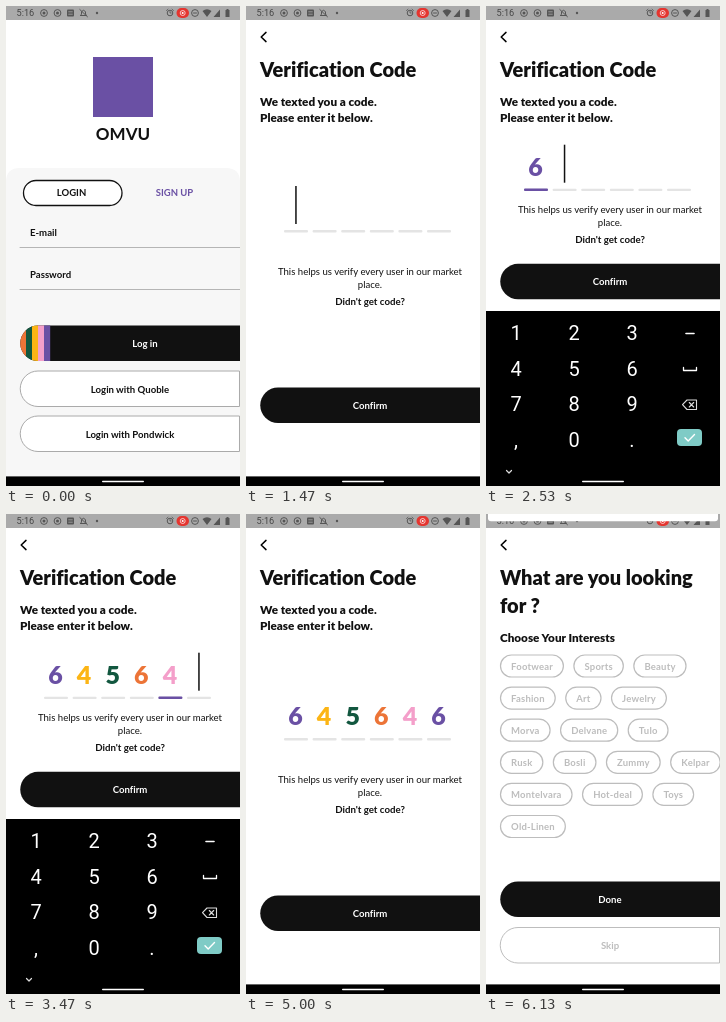
Recreate the animation shown at these times as an HTML page. Size 234x480 px, loop 6.19 s.

```html
<!DOCTYPE html>
<html lang="en">
<head>
<meta charset="utf-8">
<title>Sign-in flow</title>
<style>
  html, body { margin: 0; height: 100%; overflow: hidden; background: #fff; }
  svg { display: block; width: 100vw; height: 100vh; }
  text { font-family: Lato, sans-serif; font-variant-ligatures: none; white-space: pre; }
  .keys text, .status text { font-family: Roboto, sans-serif; }
  #chips text { letter-spacing: .2px; }
</style>
</head>
<body>
<svg id="stage" viewBox="0 0 234 480"></svg>
<script>
const PURPLE = '#6a50a4', YELLOW = '#fcb515', GREEN = '#12573f', ORANGE = '#ec7437', PINK = '#f49fca';
const INK = '#111', PALE = '#bdbdbd';
const LOOP = 6190, TICKS_PER_MS = 15 / 1000;

const CODE = '645646';
const CODE_COLORS = [PURPLE, YELLOW, GREEN, ORANGE, PINK, PURPLE];
const TYPED = [37, 40, 43, 47, 51, 54];   // tick at which each digit appears
const KEY_COLUMN = { 4: 0, 5: 1, 6: 2 };
const CHIPS = [
  ['Footwear', 'Sports', 'Beauty'],
  ['Fashion', 'Art', 'Jewelry'],
  ['Morva', 'Delvane', 'Tulo'],
  ['Rusk', 'Bosli', 'Zummy', 'Kelpar'],
  ['Montelvara', 'Hot-deal', 'Toys'],
  ['Old-Linen'],
];

// Markup helpers
const text = (s, x, y, size, { fill = INK, weight = 700, anchor = 'start', more = '' } = {}) =>
  `<text x="${x}" y="${y}" font-size="${size}" font-weight="${weight}" fill="${fill}" text-anchor="${anchor}" ${more}>${s}</text>`;
const centered = (s, x, y, size, options) => text(s, x, y, size, { anchor: 'middle', ...options });
const heading = (s, y, size) => text(s, 14, y, size, { weight: 900 });
const rect = (x, y, w, h, fill, more = '') =>
  `<rect x="${x}" y="${y}" width="${w}" height="${h}" fill="${fill}" ${more}/>`;
const line = (d, stroke, width = 1) =>
  `<path d="${d}" fill="none" stroke="${stroke}" stroke-width="${width}" stroke-linecap="round" stroke-linejoin="round"/>`;
const pill = (y, right = 234) => `M${right} ${y}H32a17.75 17.75 0 0 0 0 35.5H${right}z`;
const button = (label, y, { fill = INK, stroke, color = '#fff', x = 124, extra = '' } = {}) =>
  `<path d="${pill(y, stroke ? 233.5 : 234)}" fill="${fill}" stroke="${stroke || 'none'}"/>${extra}` +
  centered(label, x, y + 21.6, 9.6, { fill: color });
const ripple = (id, x, y) =>
  `<clipPath id="${id}Clip"><path d="${pill(y)}"/></clipPath>
   <g clip-path="url(#${id}Clip)"><circle id="${id}" cx="${x}" cy="${y + 18}" r="0" fill="#fff" opacity=".1"/></g>`;
const page = (id, content) =>
  `<g id="${id}">${rect(-18, 0, 18, 471, 'url(#edge)')}${rect(0, 0, 235, 471, '#fff')}${content}</g>`;
const back = line('M20 26.4L15.2 31L20 35.6', '#000', 1.5);

function loginPage() {
  const stripes = [ORANGE, GREEN, YELLOW, PINK, PURPLE].map((c, i) => rect(14 + 6 * i, 319, 6.2, 38, c)).join('');
  const outline = { fill: '#fff', stroke: '#aaa', color: INK };
  return rect(87, 51, 60, 60, PURPLE) +
    centered('OMVU', 117, 134, 17) +
    '<path d="M0 471V176Q0 162 14 162H220Q234 162 234 176V471z" fill="#f7f7f7"/>' +
    rect(17.5, 174.5, 98.5, 25, '#fff', `rx="12.5" stroke="${INK}" stroke-width="1.3"`) +
    centered('LOGIN', 65.5, 190, 9.5) +
    centered('SIGN UP', 168.5, 190, 9.5, { fill: PURPLE }) +
    text('E-mail', 24, 230, 9.6) + line('M14 241.5H234', '#b5b5b5') +
    text('Password', 24, 271.5, 9.6) + line('M14 283.5H234', '#b5b5b5') +
    button('Log in', 319.5, { x: 139, extra: ripple('loginTap', 139, 319.5) + `<g clip-path="url(#loginTapClip)">${stripes}</g>` }) +
    button('Login with Quoble', 365, outline) +
    button('Login with Pondwick', 410, outline);
}

const slotX = i => 50 + 28.6 * i;

function codePage() {
  const slots = [...CODE].map((digit, i) =>
    rect(slotX(i) - 12, 224, 24, 2.4, '#e4e4e4', 'rx="1"') +
    rect(slotX(i) - 12, 223.8, 24, 2.6, PURPLE, 'rx="1" class="active"') +
    centered(digit, slotX(i) - .5, 211, 25, { fill: CODE_COLORS[i], weight: 900, more: 'class="digit"' })).join('');
  return back +
    heading('Verification Code', 71, 20) +
    heading('We texted you a code.', 99.5, 11.7) +
    heading('Please enter it below.', 116, 11.7) +
    `<g id="slots">${slots}${rect(-.8, 180, 1.5, 38, INK, 'id="caret"')}</g>` +
    '<g id="help">' +
      centered('This helps us verify every user in our market', 124, 268.5, 9.6, { weight: 400 }) +
      centered('place.', 124, 282, 9.6, { weight: 400 }) +
      centered("Didn't get code?", 124, 299.3, 9.7) +
    '</g>' +
    `<g id="confirm">${button('Confirm', 381.5, { extra: ripple('confirmTap', 124, 381.5) })}</g>`;
}

const interestsPage = () => back +
  heading('What are you looking', 71, 20) +
  heading('for ?', 99, 20) +
  heading('Choose Your Interests', 128, 11.7) +
  '<g id="chips"></g>' +
  button('Done', 367.5) +
  button('Skip', 413.5, { fill: '#fff', stroke: PALE, color: PALE });

function keyboard() {
  const keys = ['123', '456', '789', ',0.'].map((row, r) =>
    [...row].map((key, c) => centered(key, 30 + 58 * c, 334 + 35.7 * r, 20, { fill: '#fff', weight: 400 })).join('')).join('');
  return `<g id="keyboard" class="keys">${rect(0, 305, 234, 175, '#000')}` +
    rect(1, 345, 57, 36, '#3c3c3c', 'id="press" rx="3"') + keys +
    line('M200 327.5H208', '#fff', 1.6) +
    line('M197.5 361.5V364.5H210.5V361.5', '#fff', 1.3) +
    line('M201 394H210.5V403.5H201L196.5 398.7zM203.3 396.5L207.7 401M207.7 396.5L203.3 401', '#ddd', 1.1) +
    rect(191, 423, 25, 17, '#7fcbc6', 'rx="4"') +
    line('M199 431.7L202.2 435L208.5 428.5', '#fff', 1.4) +
    line('M20.5 464.5L23 467L25.5 464.5', '#ddd', 1.2) + '</g>';
}

function statusBar() {
  const grey = '#555';
  const ring = (x, r = 3.4) => `<circle cx="${x}" cy="7" r="${r}" fill="none" stroke="${grey}"/>`;
  const dot = (x, r, fill = grey) => `<circle cx="${x}" cy="7" r="${r}" fill="${fill}"/>`;
  return `<g class="status">${rect(0, 0, 234, 14, '#aaa')}` +
    text('5:16', 10.5, 10.4, 9.2, { fill: '#444', weight: 400 }) +
    ring(38) + dot(38, 1.5) + ring(51.5) + dot(51.5, 1.5) +
    rect(61, 3.5, 7, 7, grey, 'rx="1"') + line('M62.7 5.8H66.3M62.7 8.2H66.3', '#aaa', .8) +
    line('M74.5 9.5H80.5L79.5 8V6Q77.5 2.5 75.5 6V8zM73.8 3.5L81.5 10.8', grey) +
    dot(91, 1.2) +
    ring(164, 2.8) + line('M164 5.5V7H165.2M160.5 4.5L162 3.2M167.5 4.5L166 3.2', grey, .8) +
    rect(170.5, 2, 12.5, 10, '#e5352f', 'rx="5"') +
    '<circle cx="176.7" cy="7" r="2.5" fill="none" stroke="#fff" stroke-width=".7"/>' + dot(176.7, 1, '#fff') +
    ring(189) + line('M187.5 7H190.5', grey) +
    `<path d="M196.5 5Q201 1.5 205.5 5L201 11zM207.5 11H214V3.5zM219.5 4h1v-1h2v1h1v7h-4z" fill="${grey}"/></g>`;
}

const $ = id => document.getElementById(id);
$('stage').innerHTML =
  `<linearGradient id="edge"><stop stop-opacity="0"/><stop offset="1" stop-opacity=".06"/></linearGradient>` +
  page('login', loginPage()) + page('code', codePage()) + page('interests', interestsPage()) +
  keyboard() + statusBar() +
  rect(2, -20, 230, 27.3, '#fff', 'id="banner" rx="3"') +
  rect(0, 470.4, 234, 10, '#000') + rect(96, 474.8, 42, 1.5, '#fff', 'rx=".7"');

// Chips take their width from their label
CHIPS.forEach((row, r) => {
  let x = 14.5;
  for (const label of row) {
    const y = 141 + 32.1 * r;
    $('chips').insertAdjacentHTML('beforeend', text(label, x + 10.6, y + 14.8, 9.5, { fill: PALE }));
    const width = $('chips').lastElementChild.getComputedTextLength() + 21;
    $('chips').insertAdjacentHTML('beforeend', rect(x, y, width, 22, 'none', `rx="11" stroke="${PALE}" stroke-width="1.2"`));
    x += width + 10.5;
  }
});

// Motion
const ramp = (t, from, to) => Math.min(1, Math.max(0, (t - from) / (to - from)));
const bezier = (a, b, s) => 3 * (1 - s) ** 2 * s * a + 3 * (1 - s) * s * s * b + s ** 3;
function slideEase(x) {
  let low = 0, high = 1;
  for (let i = 0; i < 24; i++) {
    const mid = (low + high) / 2;
    if (bezier(.35, .33, mid) < x) low = mid; else high = mid;
  }
  return bezier(.91, .97, high);
}
const move = (id, x, y) => $(id).setAttribute('transform', `translate(${x} ${y})`);
const show = (element, visible) => element.setAttribute('opacity', +visible);
const between = (t, from, to) => t >= from && t < to;

const digits = [...document.querySelectorAll('.digit')];
const underlines = [...document.querySelectorAll('.active')];

function draw(t) {
  const toCode = slideEase(ramp(t, 6, 12)), toInterests = slideEase(ramp(t, 79, 85));
  move('login', -78 * toCode, 0);
  move('code', 234 * (1 - toCode) - 78 * toInterests, 0);
  move('interests', 234 * (1 - toInterests), 0);
  show($('code'), t > 6);
  show($('interests'), t > 79);
  $('loginTap').setAttribute('r', between(t, 5, 12) ? 10 * (t - 4) : 0);
  $('confirmTap').setAttribute('r', between(t, 78, 85) ? 10 * (t - 77) : 0);

  // The page makes room at once while the keyboard slides
  const compact = between(t, 29, 56) ? 1 : 0;
  move('slots', 0, -41.3 * compact);
  move('help', 0, -62 * compact);
  move('confirm', 0, -123.7 * compact);
  const opened = 1 - (1 - ramp(t, 27, 33)) ** 3, closed = ramp(t, 54, 58) ** 2;
  move('keyboard', 0, 175 * (1 - opened + closed));

  const count = TYPED.filter(at => t >= at).length;
  digits.forEach((digit, i) => show(digit, i < count));
  underlines.forEach((underline, i) => {
    const on = i ? ramp(t, TYPED[i - 1] + 1.2, TYPED[i - 1] + 3) : ramp(t, 22.5, 26);
    underline.setAttribute('opacity', on * (1 - ramp(t, TYPED[i] + 1.2, TYPED[i] + 3)));
  });
  $('caret').setAttribute('transform', `translate(${slotX(count)} 0)`);
  show($('caret'), t >= 22 && count < 6);

  const pressed = TYPED.indexOf(t + 1);
  show($('press'), pressed >= 0);
  if (pressed >= 0) move('press', 58 * KEY_COLUMN[CODE[pressed]], 0);
  show($('banner'), t >= 92);
}

function frame() {
  draw(Math.floor(performance.now() % LOOP * TICKS_PER_MS + .15));
  requestAnimationFrame(frame);
}
frame();
</script>
</body>
</html>
```
